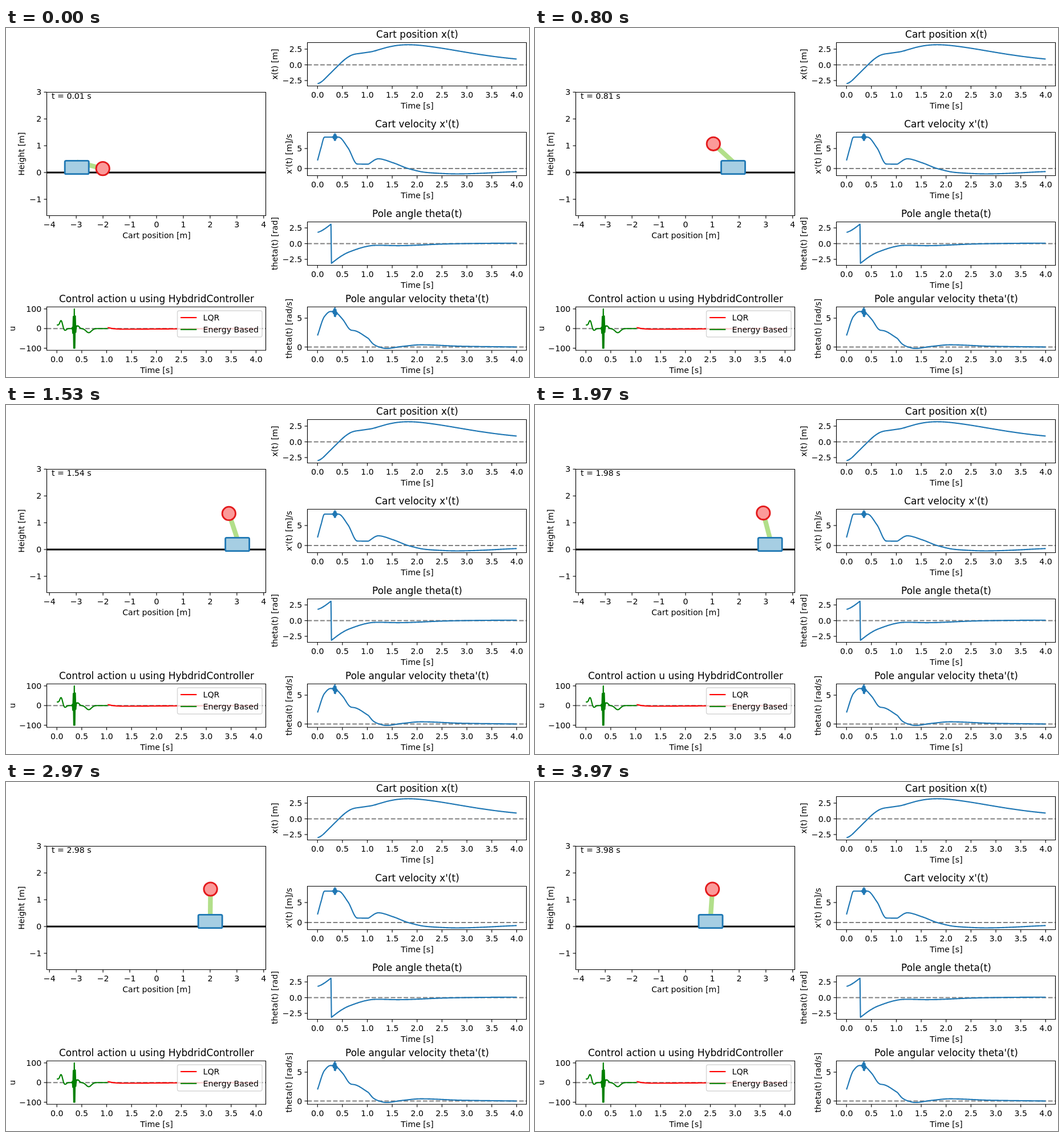
An HTML page with a canvas for the animation above (4010 ms loop, 917x611 px).

```html
<!DOCTYPE html>
<html>
<head>
<meta charset="utf-8">
<title>Cart and pole</title>
<style>
html, body { margin: 0; width: 100%; height: 100%; overflow: hidden; background: #fff; }
canvas { display: block; }
</style>
</head>
<body>
<canvas width="917" height="611"></canvas>
<script>
const ctx = document.querySelector('canvas').getContext('2d');
const BLUE = '#1f77b4', GREEN = '#008000', RED = '#ff0000';
const PT = 1.415;                       // pixels per point
const SMALL = 10 * PT, LARGE = 12 * PT, STROKE = 1.5 * PT, THIN = .8 * PT;
const SWITCH = 1.02;                    // swing-up hands over to balancing

// Monotone cubic curve through [time, value] keys
function spline(...keys) {
  const last = keys.length - 1;
  const secant = i => (keys[i + 1][1] - keys[i][1]) / (keys[i + 1][0] - keys[i][0]);
  const slope = i => {
    if (i === 0) return secant(0);
    if (i === last) return secant(last - 1);
    const a = secant(i - 1), b = secant(i);
    return a * b <= 0 ? 0 : 2 * a * b / (a + b);
  };
  return t => {
    let i = 0;
    while (i < last - 1 && t > keys[i + 1][0]) i++;
    const [t0, v0] = keys[i], [t1, v1] = keys[i + 1];
    const h = t1 - t0, s = (t - t0) / h, r = 1 - s;
    return r * r * ((1 + 2 * s) * v0 + s * h * slope(i))
         + s * s * ((3 - 2 * s) * v1 - r * h * slope(i + 1));
  };
}

const phases = (swing, balance) => t => t < SWITCH ? swing(t) : balance(t);

// Running integral of a rate, sampled every 10 ms
function integrate(rate, start) {
  const sums = [start];
  for (let i = 1; i <= 400; i++) {
    sums.push(sums[i - 1] + (rate((i - 1) / 100) + rate(i / 100)) / 200);
  }
  return t => sums[Math.round(t * 100)];
}

const cartV = phases(
  spline([0, 2], [.07, 5.2], [.14, 7.85], [.42, 7.85], [.61, 5.2], [.8, 1.12], [SWITCH, 1.08]),
  spline([SWITCH, 1.08], [1.22, 2.43], [1.53, 1.38], [1.82, 0], [2.2, -1], [2.8, -1.35], [4, -.76]));
const spin = phases(
  spline([0, 2], [.14, 5.3], [.26, 6.15], [.36, 6], [.5, 4.85], [.67, 2.95], [.76, 2.8], [SWITCH, 1.5]),
  spline([SWITCH, 1.5], [1.13, .45], [1.24, 0], [1.38, -.25], [1.7, .1], [2.08, .38], [2.9, .13], [4, 0]));
const cartX = integrate(cartV, -3);
const angle = integrate(spin, 1.8);
const wrap = a => a > Math.PI ? a - 2 * Math.PI : a;

const bump = (t, center, width) => Math.exp(-(((t - center) / width) ** 2));
// Chatter flips its sign at every 10 ms sample
const chatter = (t, amp, width) =>
  (Math.round(t * 100) % 2 ? 1 : -1) * amp * bump(t, .35, width);

function push(t) {
  const u = 18 * bump(t, 0, .05) + 40 * bump(t, .085, .04) - 10 * bump(t, .16, .04)
    + 14 * bump(t, .42, .04) - 21 * bump(t, .64, .075) + chatter(t, 130, .023);
  return Math.max(-100, Math.min(100, u));
}
const lqr = t => 11 * Math.exp((SWITCH - t) / .12) - 5 * Math.exp((SWITCH - t) / 1.2);

function text(s, x, y, align = 'center', size = SMALL) {
  ctx.font = `${size}px "DejaVu Sans", sans-serif`;
  ctx.textAlign = align;
  ctx.fillStyle = '#000';
  ctx.fillText(s, x, y);
}

function line(color, width, ...pts) {
  ctx.strokeStyle = color;
  ctx.lineWidth = width;
  ctx.beginPath();
  for (let i = 0; i < pts.length; i += 2) ctx.lineTo(pts[i], pts[i + 1]);
  ctx.stroke();
}

const num = (v, digits) => v.toFixed(digits).replace('-', '\u2212');
const range = (from, to, step = 1) =>
  Array.from({ length: (to - from) / step + 1 }, (_, i) => from + i * step);

function axes(a) {
  const { left, top, h, x, y } = a, bottom = top + h, mid = left + 192.5;
  ctx.strokeStyle = '#000';
  ctx.lineWidth = THIN;
  ctx.strokeRect(left, top, 384, h);
  for (const v of a.xTicks) {
    line('#000', THIN, x(v), bottom, x(v), bottom + 5);
    text(num(v, a.xDigits), x(v), bottom + 20.3);
  }
  for (const v of a.yTicks) {
    line('#000', THIN, left - 5, y(v), left, y(v));
    text(num(v, a.yDigits), left - 9.3, y(v) + 5.1, 'right');
  }
  text(a.xLabel, mid, bottom + 39.7);
  if (a.title) text(a.title, mid, top - 8.2, 'center', LARGE);
  ctx.save();
  ctx.translate(a.labelX, top + h / 2);
  ctx.rotate(-Math.PI / 2);
  text(a.yLabel, 0, 0);
  ctx.restore();
}

function curve(a, f, color, from = 0, to = 400) {
  const pts = range(from, to).flatMap(i => [a.x(i / 100), a.y(f(i / 100))]);
  line(color, STROKE, ...pts);
}

function zeroLine(a) {
  ctx.setLineDash([3.7 * STROKE, 1.6 * STROKE]);
  line('#808080', STROKE, a.left, a.y(0), a.left + 384, a.y(0));
  ctx.setLineDash([]);
}

function plot(left, top, zero, scale, yTicks, yDigits, title, yLabel, labelX) {
  return {
    left, top, h: 76, yTicks, yDigits, title, yLabel, labelX,
    xTicks: range(0, 4, .5), xDigits: 1, xLabel: 'Time [s]',
    x: t => left + 17.7 + 87.3 * t,
    y: v => zero - scale * v
  };
}

const RIGHT = 528.5, LEFT = 71.5, wide = range(-2.5, 2.5, 2.5);
const plots = [
  [plot(RIGHT, 25.5, 64.5, 11, wide, 1, 'Cart position x(t)', 'x(t) [m]', 476), cartX],
  [plot(RIGHT, 182.5, 246, 7, [0, 5], 0, "Cart velocity x'(t)", "x'(t) [m]/s", 501),
    t => cartV(t) + chatter(t, .9, .03)],
  [plot(RIGHT, 339.5, 377.5, 11, wide, 1, 'Pole angle theta(t)', 'theta(t) [rad]', 476),
    t => wrap(angle(t))],
  [plot(RIGHT, 488.2, 558.5, 10.1, [0, 5], 0, "Pole angular velocity theta'(t)",
    'theta(t) [rad/s]', 501), t => spin(t) + chatter(t, .8, .03)]
];
const control = plot(LEFT, 488.2, 526.2, .344, range(-100, 100, 100), 0,
  'Control action u using HybdridController', 'u', 16);
const scene = {
  left: LEFT, top: 112.5, h: 216, x: v => 264 + 46.95 * v, y: v => 253 - 46.9 * v,
  xTicks: range(-4, 4), xDigits: 0, yTicks: range(-1, 3), yDigits: 0,
  xLabel: 'Cart position [m]', yLabel: 'Height [m]', labelX: 32.3
};

function shape(fill, stroke, width, build) {
  ctx.beginPath();
  build();
  ctx.fillStyle = fill;
  ctx.fill();
  ctx.strokeStyle = stroke;
  ctx.lineWidth = width;
  ctx.stroke();
}

function legend() {
  shape('rgba(255,255,255,.8)', 'rgba(204,204,204,.8)', PT,
    () => ctx.roundRect(300.5, 495, 148.5, 46, 3));
  [['LQR', RED], ['Energy Based', GREEN]].forEach(([name, color], i) => {
    const y = 507 + 20.8 * i;
    line(color, STROKE, 306, y, 334.3, y);
    text(name, 345.5, y + 5, 'left');
  });
}

function cartPole(t) {
  const x = scene.x(cartX(t)), a = angle(t), pivot = 234.5;
  const bobX = x + 47 * Math.sin(a), bobY = pivot - 47 * Math.cos(a);
  line('#000', 2 * PT, LEFT, 253, LEFT + 384, 253);
  line('#b2df8a', 8.3, x, pivot, bobX, bobY);
  shape('#a6cee3', '#1f78b4', 2 * PT, () => ctx.roundRect(x - 21, 232.3, 42, 23.4, 2.3));
  shape('#fb9a99', '#e31a1c', 2 * PT, () => ctx.arc(bobX, bobY, 11.7, 0, 2 * Math.PI));
}

function draw(t) {
  ctx.fillStyle = '#fff';
  ctx.fillRect(0, 0, 917, 611);
  ctx.lineJoin = 'round';
  for (const [a, f] of plots) {
    zeroLine(a);
    curve(a, f, BLUE);
    axes(a);
  }
  zeroLine(control);
  curve(control, lqr, RED, 102);
  curve(control, push, GREEN, 0, 102);
  axes(control);
  legend();
  cartPole(t);
  axes(scene);
  text(`t = ${t.toFixed(2)} s`, 80, 123.6, 'left');
}

// 30 steps per second, each starting on a whole hundredth of a second
let shown = -1;
function tick() {
  const hundredths = Math.floor(performance.now() % 4010 / 10);
  const step = Math.min(119, Math.floor(hundredths * .3 + .1 + 1e-6));
  if (step !== shown) {
    shown = step;
    draw(.01 + Math.round(step * 10 / 3) / 100);
  }
  requestAnimationFrame(tick);
}
tick();
</script>
</body>
</html>
```
